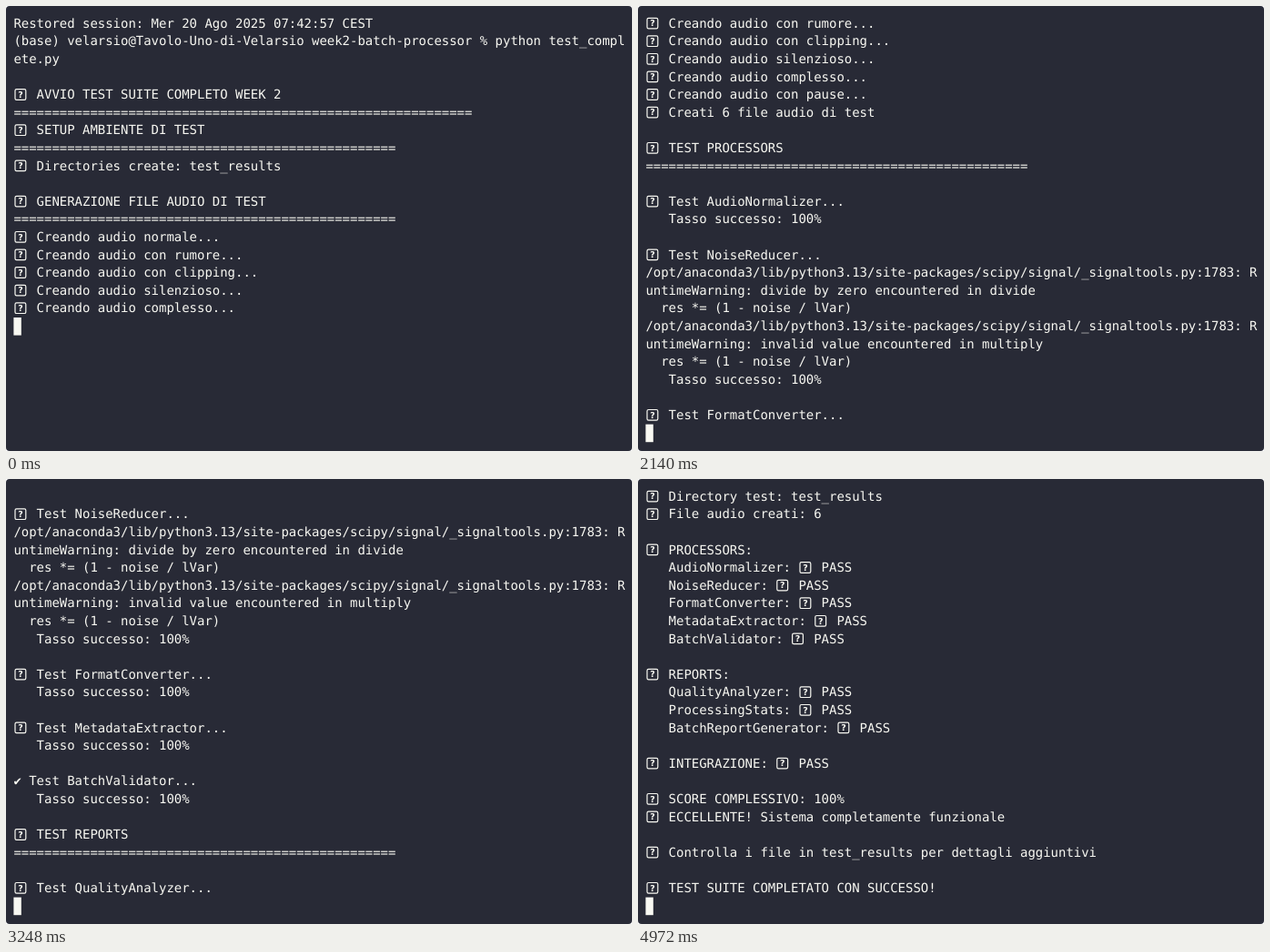
Animation of 688x490 px, one loop 5.64 s. Source, as an HTML page:

```html
<!DOCTYPE html>
<html lang="it">
<head>
<meta charset="utf-8">
<title>Test suite</title>
<style>
  html, body { margin: 0; width: 100%; height: 100%; overflow: hidden; background: #fff; }
  svg { display: block; fill: #f8f8f2; }
  text { font: 14px "DejaVu Sans Mono", monospace; white-space: pre; text-rendering: geometricPrecision; }
  .mark { font: bold 9.5px "DejaVu Sans", sans-serif; text-anchor: middle; }
</style>
</head>
<body>
<svg width="688" height="490" viewBox="0 0 688 490">
  <defs>
    <g id="box">
      <rect x="1.6" y="3.5" width="11.8" height="11.6" rx="1.6" fill="none" stroke="#f8f8f2" stroke-width="1.2"/>
      <text class="mark" x="7.5" y="12.7">?</text>
    </g>
  </defs>
  <rect width="688" height="490" rx="4" fill="#282a36"/>
  <!-- the tiny skew keeps fractional baselines from snapping to whole pixels -->
  <g id="screen" transform="translate(8.4 9.8) skewY(0.0005)"></g>
  <rect id="cursor" x="8.4" width="8.4" height="19.6"/>
</svg>
<script>
const COL = 8.4, ROW = 19.6, TOP = 9.8, LOOP = 5640;
const SVG = 'http://www.w3.org/2000/svg';

// "□" marks a boxed question mark, two columns wide.
const item = text => '□  ' + text;
const section = text => [item(text), '='.repeat(50)];
const pass = name => `   ${name}: □  PASS`;
const success = '   Tasso successo: 100%';
const test = name => item(`Test ${name}...`);
const warning = message => [
  '/opt/anaconda3/lib/python3.13/site-packages/scipy/signal/_signaltools.py:1783: R',
  'untimeWarning: ' + message,
  '  res *= (1 - noise / lVar)'
];

const log = [
  'Restored session: Mer 20 Ago 2025 07:42:57 CEST',
  '(base) velarsio@Tavolo-Uno-di-Velarsio week2-batch-processor % python test_compl',
  'ete.py',
  '',
  item('AVVIO TEST SUITE COMPLETO WEEK 2'),
  '='.repeat(60),
  ...section('SETUP AMBIENTE DI TEST'),
  item('Directories create: test_results'),
  '',
  ...section('GENERAZIONE FILE AUDIO DI TEST'),
  ...['normale', 'con rumore', 'con clipping', 'silenzioso', 'complesso', 'con pause']
    .map(kind => item(`Creando audio ${kind}...`)),
  item('Creati 6 file audio di test'),
  '',
  ...section('TEST PROCESSORS'),
  '',
  test('AudioNormalizer'), success,
  '',
  test('NoiseReducer'),
  ...warning('divide by zero encountered in divide'),
  ...warning('invalid value encountered in multiply'),
  success,
  '',
  test('FormatConverter'), success,
  '',
  test('MetadataExtractor'), success,
  '',
  '✔ Test BatchValidator...', success,
  '',
  ...section('TEST REPORTS'),
  '',
  test('QualityAnalyzer'), success,
  '',
  test('ProcessingStats'),
  '   Batch results generati correttamente',
  '',
  test('BatchReportGenerator'),
  '   Report generato: test_results/reports/batch_processing_report_20250820_074638',
  '.md',
  '',
  ...section('TEST INTEGRAZIONE WORKFLOW'),
  '1□Validazione batch...',
  '2□Analisi qualità batch...',
  item('Directory test: test_results'),
  item('File audio creati: 6'),
  '',
  item('PROCESSORS:'),
  ...['AudioNormalizer', 'NoiseReducer', 'FormatConverter', 'MetadataExtractor', 'BatchValidator'].map(pass),
  '',
  item('REPORTS:'),
  ...['QualityAnalyzer', 'ProcessingStats', 'BatchReportGenerator'].map(pass),
  '',
  item('INTEGRAZIONE: □  PASS'),
  '',
  item('SCORE COMPLESSIVO: 100%'),
  item('ECCELLENTE! Sistema completamente funzionale'),
  '',
  item('Controlla i file in test_results per dettagli aggiuntivi'),
  '',
  item('TEST SUITE COMPLETATO CON SUCCESSO!')
];

// Start time in ms, first and last visible log line (end exclusive).
const views = [
  [0, 0, 17], [40, 1, 24], [2140, 13, 36], [2240, 25, 48], [3920, 38, 61], [3970, 61, 84]
];

const screen = document.getElementById('screen');
const cursor = document.getElementById('cursor');

function add(parent, tag, attributes) {
  const node = document.createElementNS(SVG, tag);
  for (const name in attributes) node.setAttribute(name, attributes[name]);
  return parent.appendChild(node);
}

function drawLine(line, row) {
  const chars = [...line];
  const xs = chars.map((_, col) => (col * COL).toFixed(2));
  add(screen, 'text', { x: xs.join(' '), y: row * ROW + 14 }).textContent = line.replaceAll('□', ' ');
  chars.forEach((char, col) => {
    if (char === '□') add(screen, 'use', { href: '#box', x: xs[col], y: row * ROW });
  });
}

let shown;
function tick() {
  const time = performance.now() % LOOP;
  const view = views.findLast(([start]) => time >= start);
  if (view !== shown) {
    shown = view;
    const [, first, end] = view;
    screen.replaceChildren();
    log.slice(first, end).forEach(drawLine);
    cursor.setAttribute('y', TOP + (end - first) * ROW);
  }
  requestAnimationFrame(tick);
}
tick();
</script>
</body>
</html>
```
